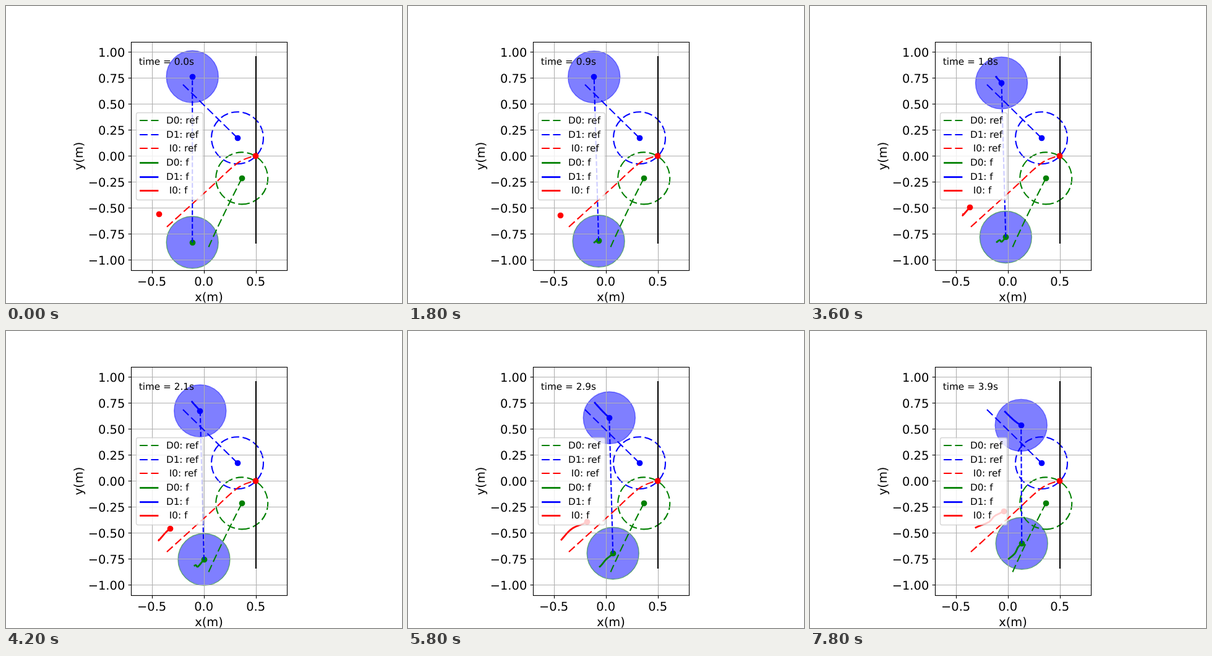
Recreate the animation shown at these times as an HTML page. Size 640 px wide and 480 px high, loop 8 s.

```html
<!DOCTYPE html>
<html lang="en">
<head>
<meta charset="utf-8">
<title>Path tracking plot</title>
<style>
html, body { margin: 0; width: 100%; height: 100%; overflow: hidden; background: #fff; }
svg { display: block; width: 640px; height: 480px; font-family: "DejaVu Sans", sans-serif; text-rendering: geometricPrecision; }
.small { font-size: 15.28px; white-space: pre; }
.big { font-size: 19.44px; }
.axis { stroke: #000; stroke-width: 1.11; }
.grid { stroke: #b0b0b0; stroke-width: 1.11; }
.ref { stroke-width: 2.08; stroke-dasharray: 12.85 5.55; }
.run { stroke-width: 2.78; stroke-linejoin: round; stroke-linecap: square; }
</style>
</head>
<body>
<svg id="plot" viewBox="0 0 640 480"></svg>
<script>
const STEP = 200, STEPS = 40, TAIL = 17, R = 42;
const svg = document.getElementById('plot');

function set(el, attrs) {
  for (const key in attrs) el.setAttribute(key, attrs[key]);
  return el;
}
function add(tag, attrs, text = '') {
  const el = set(document.createElementNS('http://www.w3.org/2000/svg', tag), attrs);
  el.textContent = text;
  return svg.appendChild(el);
}
const path = (d, attrs) => add('path', { d, fill: 'none', ...attrs });
const dashed = (stroke, d) => path(d, { class: 'ref', stroke });

// Markers sit on pixel centres
const snap = v => Math.floor(v) + .5;
const place = (el, [x, y]) => set(el, { cx: snap(x), cy: snap(y) });
const dot = (fill, at) => place(add('circle', { r: 4.86, fill }), at);

// Way points, reached at the steps in KNOTS
const KNOTS = [0, 6, 12, 21, 29, 34, 39];
const bodies = [
  { name: 'D0', color: 'green', disc: true, way: '301.2 382, 306.5 378.4, 310 380.8, 320 369.3, 331.2 359.3, 336.3 349.3, 342.2 343.3' },
  { name: 'D1', color: 'blue', disc: true, way: '301.2 114.3, 300.6 114.5, 302 116, 313.8 129, 325.3 140.3, 333.2 147.2, 341.2 152.4' },
  { name: ' I0', color: 'red', way: '247.5 336.4, 247.2 338, 248 337.2, 265.3 319.3, 289.3 308.6, 298.2 299.2, 313.4 291.3' }
];

// Smooth curve through the way points (cubic Hermite)
function along(points, n) {
  const last = KNOTS.length - 1;
  const i = Math.max(0, KNOTS.findIndex(k => k >= n) - 1);
  const h = KNOTS[i + 1] - KNOTS[i], u = (n - KNOTS[i]) / h;
  return [0, 1].map(c => {
    const slope = j => {
      const p = Math.max(0, j - 1), q = Math.min(last, j + 1);
      return (points[q][c] - points[p][c]) / (KNOTS[q] - KNOTS[p]) * h;
    };
    const a = points[i][c], d = points[i + 1][c] - a, s = slope(i), e = slope(i + 1);
    return a + u * s + u * u * (3 * d - 2 * s - e) + u ** 3 * (s + e - 2 * d);
  });
}

for (const b of bodies) {
  const points = b.way.split(',').map(p => p.trim().split(' ').map(Number));
  b.track = Array.from({ length: STEPS }, (_, n) => along(points, n));
  if (b.disc) b.disc = add('circle', { r: R, fill: 'blue', stroke: b.color, 'stroke-width': 1.39, 'fill-opacity': .5, 'stroke-opacity': .5 });
}

// Goal rings
const goals = [['green', [381.2, 278.4]], ['blue', [374, 213.2]], ['red', [403.6, 242.4]]];
for (const [color, [x, y]] of goals.slice(0, 2))
  dashed(color, `M${x} ${y + R}a${R} ${R} 0 0 0 0 ${-2 * R}a${R} ${R} 0 0 0 0 ${2 * R}`);

// Grid, ticks and labels
const label = (x, y, text, anchor) => add('text', { class: 'big', x, y, 'text-anchor': anchor }, text);
const num = (v, digits) => v.toFixed(digits).replace('-', '−');
for (let i = -1; i <= 1; i++) {
  const x = 320.5 + 84 * i;
  path(`M${x} 58V427`, { class: 'grid' });
  path(`M${x} 427.5v4.86`, { class: 'axis' });
  label(x - .9, 452, num(i / 2, 1), 'middle');
}
for (let i = -4; i <= 4; i++) {
  const y = 242.5 - 42 * i;
  path(`M202 ${y}H454`, { class: 'grid' });
  path(`M202.5 ${y}h-4.86`, { class: 'axis' });
  label(192.3, y + 7.5, num(i / 4, 2), 'end');
}
label(328, 476.5, 'x(m)', 'middle');
set(label(0, 0, 'y(m)', 'middle'), { transform: 'translate(123.5 242.4) rotate(-90)' });

// Planned routes and wall
dashed('green', 'M327.5 389.5Q337 368 350 341T381.2 278.4');
dashed('blue', 'M286 127L374 213.2');
dashed('red', 'M260 357L340 284.5Q366 259 377 252T404 242.4l-3-3 5-2');
path('M404 81V384', { stroke: '#000', 'stroke-width': 2.08 });
for (const [color, at] of goals) dot(color, at);

for (const b of bodies) {
  b.tail = path('', { class: 'run', stroke: b.color });
  b.dot = dot(b.color, b.track[0]);
}
const link = path('', { stroke: 'blue', 'stroke-width': 2.08, 'stroke-dasharray': '7.71 3.33' });
add('rect', { class: 'axis', x: 202.5, y: 58.5, width: 252, height: 369, fill: 'none' });
const clock = add('text', { class: 'small', x: 214.7, y: 95 });

// Legend
add('rect', { x: 210.5, y: 172.5, width: 108, height: 141, rx: 3, fill: '#fff', stroke: '#ccc', 'stroke-width': 1.39, opacity: .8 });
['ref', 'f'].forEach((kind, k) => bodies.forEach(({ name, color }, i) => {
  const y = Math.round(185 + 22.63 * (3 * k + i));
  if (k) path(`M217.5 ${y + .5}h27.5`, { class: 'run', stroke: color });
  else dashed(color, `M216 ${y}h30.5`);
  add('text', { class: 'small', x: 258.9, y: y + 5 }, `${name}: ${kind}`);
}));

function draw(ms) {
  const n = Math.floor(ms / STEP) % STEPS;
  for (const b of bodies) {
    const [cx, cy] = b.track[n];
    place(b.dot, b.track[n]);
    if (b.disc) set(b.disc, { cx, cy });
    set(b.tail, { d: n ? 'M' + b.track.slice(Math.max(0, n - TAIL), n + 1).join('L') : '' });
  }
  set(link, { d: `M${bodies[0].track[n]}L${bodies[1].track[n]}` });
  clock.textContent = `time = ${(n / 10).toFixed(1)}s`;
}

let start;
function tick(now) {
  start ??= now;
  draw(now - start);
  requestAnimationFrame(tick);
}
draw(0);
requestAnimationFrame(tick);
</script>
</body>
</html>
```
